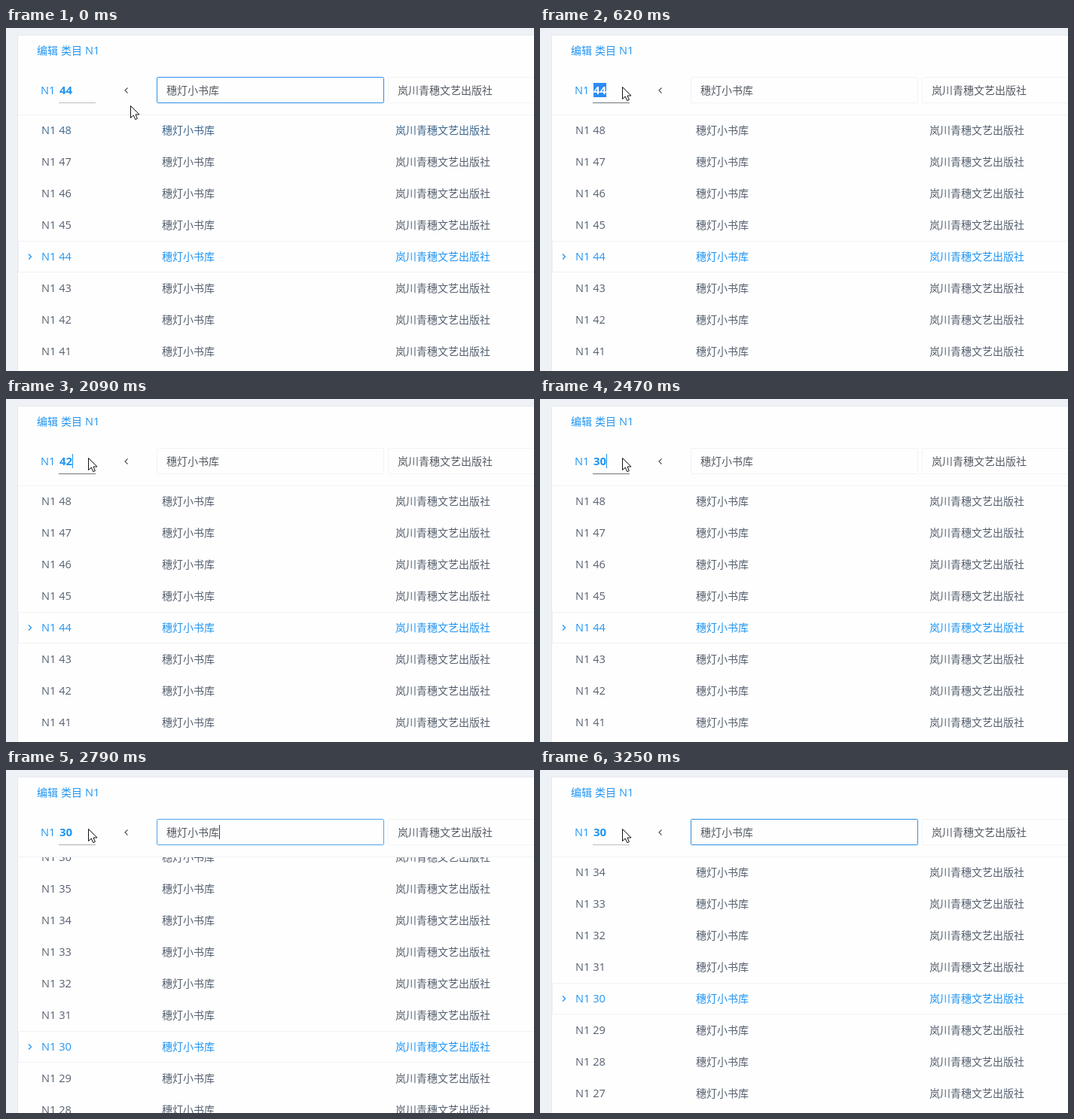
Animation, 701 px wide and 456 px high, one loop 3.36 s. Source, as an HTML page:

```html
<!DOCTYPE html>
<html lang="zh-CN">
<head>
<meta charset="utf-8">
<title>类目</title>
<style>
  html, body { margin: 0; width: 100%; height: 100%; overflow: hidden; background: #eef2f6; }
  svg { display: block; width: 701px; height: 456px; }
  text { font: 14px "Noto Sans CJK SC", "Noto Sans CJK", sans-serif; white-space: pre; }
  .lat { font: 14.6px "Open Sans", "Noto Sans", sans-serif; }
  .num { font: bold 15px "Open Sans", "Noto Sans", sans-serif; }
  .med { font-weight: 500; }
  .blue { fill: #2095f2; }
  .ink { fill: #555b63; }
</style>
</head>
<body>
<svg id="stage" viewBox="0 0 701 456">
  <defs>
    <clipPath id="view"><rect x="16" y="116" width="685" height="340"/></clipPath>
  </defs>
  <rect width="701" height="456" fill="#eef2f6"/>
  <rect x="15" y="9" width="700" height="460" fill="#e6eaef"/>
  <rect x="16" y="10" width="700" height="460" fill="#fefefe"/>

  <g class="blue">
    <text class="med" x="41" y="35">编辑</text>
    <text class="med" x="73" y="35">类目</text>
    <text class="lat med" x="105" y="35">N1</text>
    <text class="lat med" x="46" y="88">N1</text>
  </g>

  <rect id="mark" x="71" y="73" width="17" height="19" fill="#2b8cf5"/>
  <text id="num" class="num" x="71" y="88"></text>
  <rect id="numCaret" x="88" y="73" width="1" height="19" fill="#2095f2"/>
  <rect id="line" x="70" y="99" width="49" height="1"/>
  <path d="M161.5 79.5 L158 83 L161.5 86.5" fill="none" stroke="#50565e" stroke-width="1.2"/>

  <rect id="field" x="200.5" y="65.5" width="301" height="34" rx="1" fill="#fefefe"/>
  <rect x="507.5" y="65.5" width="220" height="34" rx="1" fill="#fefefe" stroke="#f2f3f4"/>
  <text id="series" class="ink" x="213" y="88"></text>
  <text id="press" class="ink" x="520" y="88"></text>
  <rect id="caret" x="283" y="73" width="1" height="19" fill="#444"/>

  <rect x="16" y="115" width="685" height="1" fill="#f0f1f3"/>
  <g clip-path="url(#view)"><g id="list"></g></g>

  <path id="mouse" d="M.5 .5 V16.5 L4.2 13 L6.7 18.6 L9.4 17.4 L7 12 H12 Z" fill="#fff" stroke="#111" stroke-linejoin="round"/>
</svg>
<script>
const NS = "http://www.w3.org/2000/svg";
const LOOP = 3360, ROW = 42, TOP = 48;
const SERIES = "穗灯小书库", PRESS = "岚川青穗文艺出版社";
const $ = id => document.getElementById(id);

function add(parent, tag, attrs, text) {
  const el = document.createElementNS(NS, tag);
  for (const k in attrs) el.setAttribute(k, attrs[k]);
  if (text) el.textContent = text;
  parent.appendChild(el);
  return el;
}

// Latest value whose start time has passed.
function hold(t, keys) {
  let v = keys[0][1];
  for (const [start, value] of keys) if (t >= start) v = value;
  return v;
}

const mix = (a, b, k) =>
  `rgb(${a.map((v, i) => Math.round(v + (b[i] - v) * k)).join(",")})`;
const show = (el, on) => el.setAttribute("visibility", on ? "visible" : "hidden");

const GREY = [86, 96, 111], HOVER = [62, 103, 141], BLUE = [32, 149, 242];
const PALE = [240, 242, 244], DARK = [112, 116, 122], SOFT = [186, 189, 194];

const MOUSE = [[0, [165, 103]], [70, [150, 97]], [150, [125, 85]], [220, [112, 79]], [300, [109, 78]]];
const HOVERED = [[0, 1], [70, 0.7], [150, 0.35], [220, 0.1], [300, 0]];
const FOCUS = [[0, 1], [470, 0.6], [540, 0.15], [620, 0], [2720, 0.15], [2790, 0.8], [2870, 1]];
const SCROLL = [[0, 0], [2720, 45], [2790, 524], [2870, 588]];

$("series").textContent = SERIES;
$("press").textContent = PRESS;

const list = $("list");
const band = add(list, "g", {});
add(band, "rect", { x: 16.5, y: -25.5, width: 700, height: 41, fill: "#fefefe", stroke: "#f0f2f4" });
add(band, "path", { d: "M30 -8.5 L33.5 -5 L30 -1.5", fill: "none", stroke: "#2095f2", "stroke-width": 1.3 });

const rows = [];
for (let n = TOP; n > 24; n--) {
  const g = add(list, "g", {});
  add(g, "text", { class: "lat", x: 47 }, "N1 " + n);
  add(g, "text", { x: 207 }, SERIES);
  add(g, "text", { x: 517 }, PRESS);
  rows.push({ n, g });
}

// Key repeat counts down from 42 to 30, seen about every 76 ms.
function count(t) {
  if (t < 1630) return 44;
  if (t < 2090) return 43;
  const step = Math.min(5, Math.floor((t - 2090) / 76));
  return Math.round(42 - step * 2.4);
}

function draw(t) {
  const focus = hold(t, FOCUS), scroll = hold(t, SCROLL), hover = hold(t, HOVERED);
  const picked = t < 2720 ? 44 : 30;
  const marked = t >= 470 && t < 1630;
  const yOf = n => 141 + (TOP - n) * ROW - scroll;

  for (const { n, g } of rows) {
    g.setAttribute("transform", `translate(0 ${yOf(n)})`);
    g.setAttribute("fill", n === picked ? mix(BLUE, BLUE, 0) : mix(GREY, HOVER, n === TOP ? hover : 0));
  }
  band.setAttribute("transform", `translate(0 ${yOf(picked)})`);

  $("num").textContent = count(t);
  $("num").setAttribute("fill", marked ? "#fff" : "#2095f2");
  show($("mark"), marked);
  show($("numCaret"), t >= 1630 && t < 2720);
  show($("caret"), t >= 2720 && t < 3250);
  $("line").setAttribute("fill", mix(DARK, SOFT, focus));
  $("field").setAttribute("stroke", mix(PALE, [45, 143, 230], focus));
  $("mouse").setAttribute("transform", `translate(${hold(t, MOUSE).join(" ")})`);
}

const begin = performance.now();
function tick() {
  draw((performance.now() - begin) % LOOP);
  requestAnimationFrame(tick);
}
draw(0);
requestAnimationFrame(tick);
</script>
</body>
</html>
```
